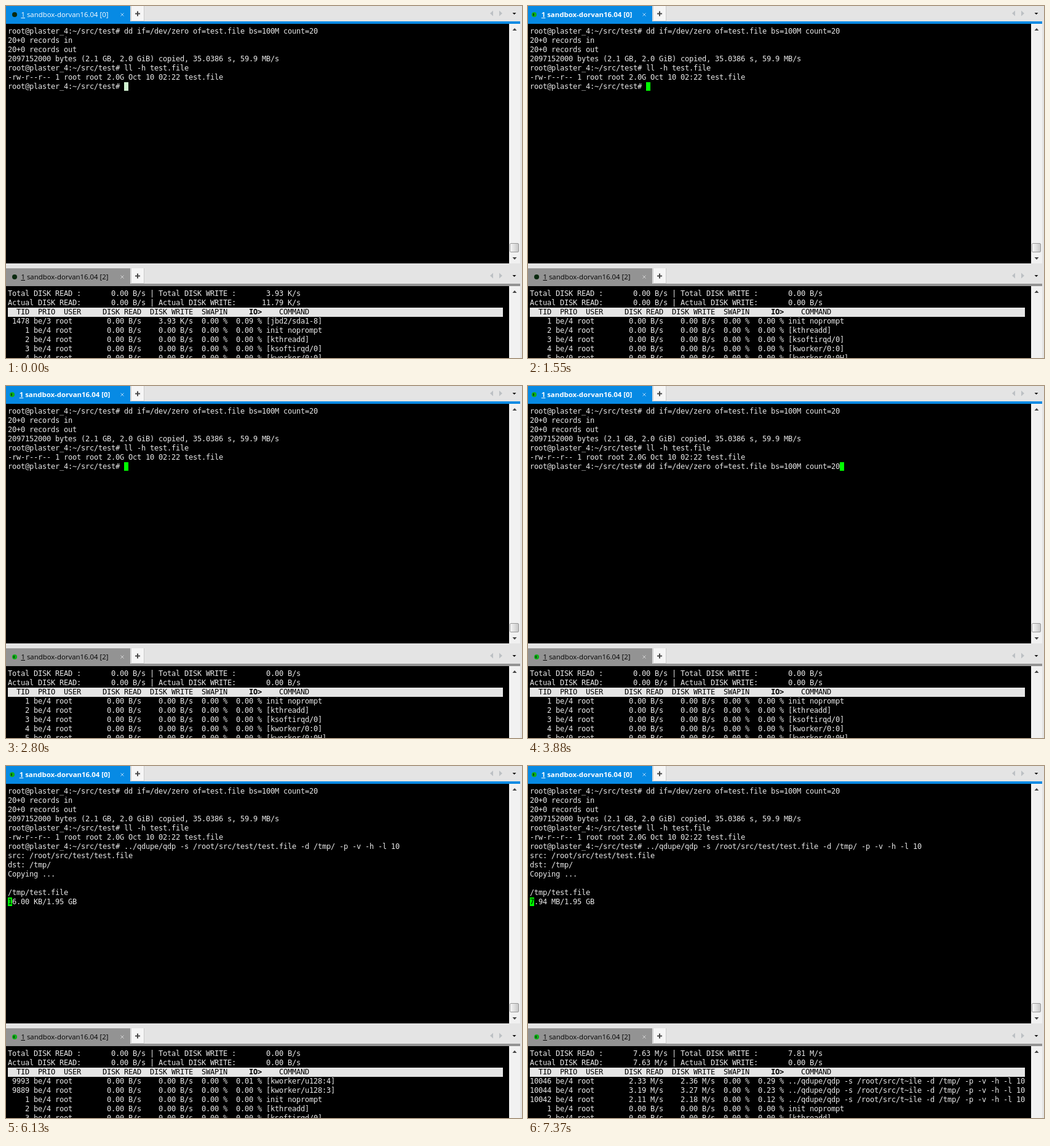
An HTML page that plays this animation: 839x573 px, repeating every 8 s.

```html
<!DOCTYPE html>
<html lang="en">
<head>
<meta charset="utf-8">
<title>Terminal</title>
<style>
  html, body { margin: 0; width: 100%; height: 100%; overflow: hidden; background: #e4e4e4; }
  #stage { position: relative; width: 839px; height: 573px; overflow: hidden; }
  .pane { position: absolute; left: 0; width: 839px; height: 420px; overflow: hidden; --tone: #939393; --ink: #000; --close: #d2d2d2; --dot: #0b2a10; }
  .pane.active { --tone: #078ae4; --ink: #fff; --close: #a9d6f7; }
  .pane.live { --dot: #10b018; }
  .pane > * { position: absolute; }
  .tab { left: 0; top: 0; width: 202px; height: 26px; background: var(--tone); }
  .strip { left: 0; top: 25px; width: 836px; height: 4px; background: var(--tone); }
  .name { left: 15px; top: 0; width: 161px; text-align: center; white-space: nowrap; color: var(--ink);
    font: 11.4px/27px "Open Sans", "Noto Sans", sans-serif; }
  .bold .name { font-weight: bold; }
  .dot { left: 10px; top: 10px; width: 8px; height: 8px; border-radius: 50%; background: var(--dot); }
  .bold .dot { left: 6px; }
  .live .dot::after { content: ""; position: absolute; left: 2px; top: 2px; width: 2px; height: 4px; background: #0b4a10; }
  .art { left: 0; top: 0; }
  .screen { left: 0; top: 29px; width: 818px; height: 390px; overflow: hidden; background: #000; }
  .lines { position: absolute; left: 3px; top: 5px; white-space: pre; color: #e8e8e8; }
  .lines, #probe { font: 12px/14px "DejaVu Sans Mono", monospace; letter-spacing: var(--fit, 0px); }
  .lines div { height: 15px; }
  .lines .head { width: 805px; background: #e5e5e5; color: #000; }
  .lines i { font-style: normal; background: #d0f2d0; color: #000; }
  .active .lines i { background: #0f0; }
  #probe { position: absolute; visibility: hidden; white-space: pre; letter-spacing: 0; }
</style>
</head>
<body>
<div id="stage"></div>
<span id="probe"></span>
<script>
const LOOP = 8000, CELL = 7;
const stage = document.getElementById('stage');

// Snap the monospace advance to the terminal grid.
const probe = document.getElementById('probe');
probe.textContent = '0'.repeat(100);
const advance = probe.getBoundingClientRect().width / 100;
document.documentElement.style.setProperty('--fit', (CELL - advance) + 'px');
probe.remove();

function makePane(top, id) {
  const el = document.createElement('div');
  el.className = 'pane';
  el.style.top = top + 'px';
  el.innerHTML = `
    <div class="tab"></div><div class="strip"></div>
    <div class="dot"></div>
    <div class="name"><u>1</u> sandbox-dorvan16.04 [${id}]</div>
    <svg class="art" width="839" height="420">
      <path d="M186.5 11.5l5 5m0-5l-5 5" stroke="var(--close)" fill="none"/>
      <path d="M203.5 0V24.5H224.5V0" fill="#f6f6f6" stroke="#cacaca"/>
      <path d="M210 12.5h8M214 8.5v8" stroke="#4a4a4a" stroke-width="2"/>
      <path d="M792 7.5v9l-5-4.5zM802 7.5v9l5-4.5z" fill="#bcc0c4"/>
      <path d="M823.5 11h6l-3 3z" fill="#111"/>
      <rect x="818" y="29" width="18" height="390" fill="#f1f1f1"/>
      <path d="M823.5 40h7l-3.5-4zM823.5 409h7l-3.5 4z" fill="#444"/>
      <linearGradient id="grip${id}"><stop stop-color="#f8f8f8"/><stop offset="1" stop-color="#c6c6c6"/></linearGradient>
      <rect x="819.5" y="386.5" width="14" height="14" rx="1.5" fill="url(#grip${id})" stroke="#989898"/>
    </svg>
    <div class="screen"><div class="lines"></div></div>`;
  stage.append(el);
  const lines = el.querySelector('.lines');
  let shown = '';
  return {
    flags(active, bold, live) {
      el.classList.toggle('active', active);
      el.classList.toggle('bold', bold);
      el.classList.toggle('live', live);
    },
    print(rows) {
      const html = rows.map(r => r.startsWith('<div') ? r : `<div>${r}</div>`).join('');
      if (html !== shown) lines.innerHTML = shown = html;
    }
  };
}

const upper = makePane(0, 0), lower = makePane(427, 2);

// Shell
const PROMPT = 'root@plaster_4:~/src/test# ';
const MAKE = 'dd if=/dev/zero of=test.file bs=100M count=20';
const LIST = 'll -h test.file';
const OPTS = ' -d /tmp/ -p -v -h -l 10';
const COPY = '../qdupe/qdp -s /root/src/test/test.file' + OPTS;
const history = [
  PROMPT + MAKE,
  '20+0 records in',
  '20+0 records out',
  '2097152000 bytes (2.1 GB, 2.0 GiB) copied, 35.0386 s, 59.9 MB/s',
  PROMPT + LIST,
  '-rw-r--r-- 1 root root 2.0G Oct 10 02:22 test.file'
];
const typed = [[0, ''], [3650, LIST + ' '], [3880, MAKE], [4730, COPY]];
const progress = [[6130, '16.00 KB'], [7140, '7.94 MB']];

// Disk monitor
const NIL = '0.00 B/s';
const task = (tid, cmd, io = '0.00', read = NIL, write = NIL, prio = 'be/4') =>
  `${String(tid).padStart(5)} ${prio} root    ${read.padStart(12)}${write.padStart(12)}  0.00 %  ${io} % ${cmd}`;
const copier = (tid, io, read, write) =>
  task(tid, '../qdupe/qdp -s /root/src/t~ile' + OPTS, io, read, write);
const idle = [
  task(1, 'init noprompt'),
  task(2, '[kthreadd]'),
  task(3, '[ksoftirqd/0]'),
  task(4, '[kworker/0:0]'),
  task(5, '[kworker/0:0H]', '0.00', NIL, NIL, 'be/0')
];
const HEAD = '<div class="head">  TID  PRIO  USER     DISK READ  DISK WRITE  SWAPIN     <b>IO&gt;</b>    COMMAND</div>';
const total = (kind, read, write) =>
  `${(kind + ' DISK READ').padEnd(16)}:${read.padStart(15)} | ${(kind + ' DISK WRITE').padEnd(17)}:${write.padStart(15)}`;
const report = (busy = [], read = NIL, write = NIL, flushed = NIL) => [
  total('Total', read, write),
  total('Actual', read, flushed),
  HEAD,
  ...[...busy, ...idle].slice(0, 5)
];
const reports = [
  [0, report([task(1478, '[jbd2/sda1-8]', '0.09', NIL, '3.93 K/s', 'be/3')], NIL, '3.93 K/s', '11.79 K/s')],
  [300, report()],
  [5350, report([task(9993, '[kworker/u128:4]', '0.01'), task(9889, '[kworker/u128:3]')])],
  [6360, report([], NIL, NIL, '3.93 K/s')],
  [7370, report([
    copier(10046, '0.29', '2.33 M/s', '2.36 M/s'),
    copier(10044, '0.23', '3.19 M/s', '3.27 M/s'),
    copier(10042, '0.12', '2.11 M/s', '2.18 M/s')
  ], '7.63 M/s', '7.81 M/s')]
];

const at = (steps, t) => steps.filter(s => s[0] <= t).pop()[1];

function shell(t) {
  const line = PROMPT + at(typed, t);
  if (t < 6130) return [...history, line + '<i> </i>'];
  const count = at(progress, t) + '/1.95 GB';
  return [...history, line, 'src: /root/src/test/test.file', 'dst: /tmp/', 'Copying ...', '',
    '/tmp/test.file', `<i>${count[0]}</i>${count.slice(1)}`];
}

function draw(t) {
  const low = t >= 1860 && t < 2800;
  upper.flags(!low, t >= 1010 && !low, t >= 1010);
  lower.flags(low, low, t >= 1860);
  upper.print(shell(t));
  lower.print(at(reports, t));
  // The shell cursor stays pale until its pane takes the keyboard.
  const cursor = stage.querySelector('.lines i');
  cursor.style.background = t < 1010 ? '#d0f2d0' : '';
}

const start = performance.now();
function tick() {
  draw((performance.now() - start) % LOOP);
  requestAnimationFrame(tick);
}
tick();
</script>
</body>
</html>
```
